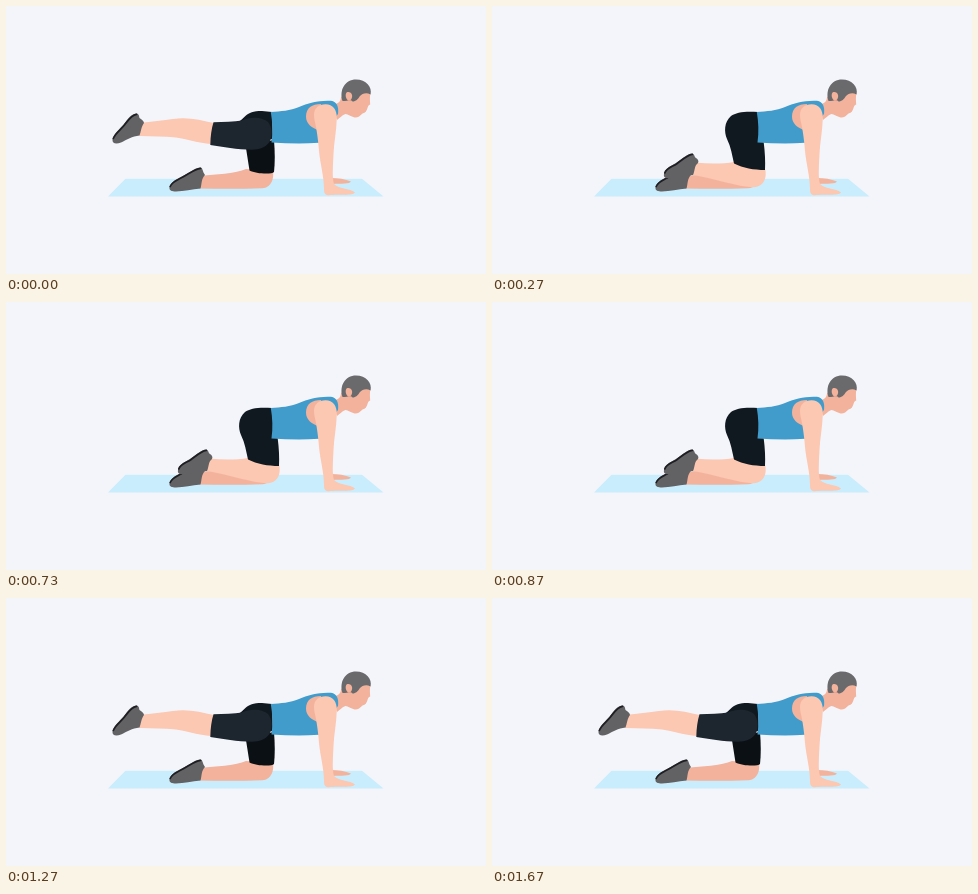
Animation of 480x268 px, one loop 1940 ms. Source, as an HTML page with a canvas:

```html
<!DOCTYPE html>
<html lang="en">
<head>
<meta charset="utf-8">
<title>Kneeling leg raise</title>
<style>
html, body { margin: 0; width: 100%; height: 100%; overflow: hidden; background: #f3f5fa; }
canvas { display: block; width: 100vw; height: 100vh; }
</style>
</head>
<body>
<canvas id="stage"></canvas>
<script>
const W = 480, H = 268;
const LOOP = 1940, LOWER_AT = 70, RAISE_AT = 1000;
const canvas = document.getElementById('stage');
const ctx = canvas.getContext('2d');

const color = {
  bg: '#f3f5fa', mat: '#c9edfc', skin: '#fcc8b2', shade: '#f3b29b',
  shirt: '#419ccb', thigh: '#1d262e', hip: '#111920', shortsFar: '#0b1015',
  shoe: '#626164', sole: '#1f1f23', hair: '#6a6a6d'
};

function fill(d, c) {
  ctx.fillStyle = c;
  ctx.fill(new Path2D(d));
}

function line(d, c, width) {
  ctx.strokeStyle = c;
  ctx.lineWidth = width;
  ctx.stroke(new Path2D(d));
}

function drawMat() {
  fill('M119.5 172.8H356L377.5 190.5H102Z', color.mat);
}

function drawFarShin() {
  fill('M195 170C211 168 227 168 240 163L267 165C268 172 266 181 257 182.3C236 183 214 183 193 182.5Z', color.shade);
  fill('M163.5 181.5C164 177 169 174 174 171.5C182 168 188 162 194 161.5C197 161.5 196 165 199 169C195 173 196 178 194.5 182.5C186 183 178 185.5 170 185.5C166 185.5 163 184.5 163.5 181.5Z', color.shoe);
  line('M164.2 180.5C166 176 170 174.5 174 172.5C182 169 188 163 194.5 162.3', color.sole, 1.7);
}

function drawRaisedLegs() {
  drawFarShin();
  fill('M239.5 139L268 134C269 146 269 157 268 166C266 168.5 250 168 243.5 164.5Z', color.shortsFar);
  // lifted leg
  fill('M133 117C146 115.5 157 114.5 167 113C181 110.5 195 114 208 117L205 138C192 137 181 133 170 131.5C158 130 146 130.5 133 130Z', color.skin);
  fill('M106.5 133.5C108 127 114 123 118 118C122 113 125 108 130 107.5C133 107.5 133 110 133.5 112C136 114 138 115 138 117C135 121 135 126 133.5 129.5C126 130.5 121 133.5 115 136.5C110 138.5 106 137.5 106.5 133.5Z', color.shoe);
  line('M107.3 132.5C109 127.5 115 123.5 118.7 118.7C122.5 113.8 125.5 109 130.5 108.3', color.sole, 1.7);
  // shorts: hip behind the raised thigh
  fill('M230 117C240 113 238 105 256 105L266 106L267 133L235 138Z', color.hip);
  fill('M207.5 116.3C218 116 228 115.5 236 114.5C245 110 257 111 262 116C266 121 267 129 263.5 136C259 142 253 143.7 246 143.7C231 143.7 217 141 204.3 139C204.5 130 205.5 123 207.5 116.3Z', color.thigh);
}

function drawLoweredLegs() {
  drawFarShin();
  fill('M203 156.5C217 158 231 158 242 156L273 162C275 171 273 180 262 181.3C245 181 222 172 201 169Z', color.skin);
  fill('M172 168C173 162 179 160 184 157C191 152 196 147.5 200 147.5C203 148 202 151 204 152C206 153 207 155 206 157C202 160 203 165 201 169C193 169 186 172.5 179 172.5C175 172.5 171 172 172 168Z', color.shoe);
  line('M172.8 167C174 162.5 179.5 161 184.5 158C191 153 196 148.5 200.3 148.3', color.sole, 1.7);
  fill('M266 106C254 105 244 106 239 110C232 116 232 126 235 133C239 141 240 149 242 157.5C251 162 262 164 273 164C274 147 271 127 266 106Z', color.hip);
}

function drawHead() {
  fill('M335 91L350 84L364.5 87C363.5 91 364 95 364.2 98.5C362.5 99 362 100 361.5 102C360.5 105 359.5 107 356.5 107.5C354 110 351.5 112 348.5 111.5C345 110.5 342 108.5 339.5 108C336 109 334 112 331 114L325 99C330 98.5 335 97 335 91Z', color.shade);
  fill('M336.5 95C333 84 339 73.5 350 73.5C360 73.5 366.5 81 364.5 88.5C360 86 356 88 354 90C352 93 350 95.5 346.5 95.5C345 93 342 95 336.5 95Z', color.hair);
  fill('M340 87.5C341 85 345.5 86 346 89C346.5 92 345 95 342.5 94.5C340.5 94 339 90 340 87.5Z', color.shade);
}

function drawUpperBody() {
  // far hand
  fill('M325 172C332 172 339 173 345 175.5C344 178 335 177.5 326 178Z', color.shade);
  drawHead();
  fill('M264.8 106C275 105.5 284 104.5 293 101C302 97 314 94 325 94.8C331 95.5 333 101 332 108L327 114L313 136.8C297 138 281 137.5 265.5 136.5C267 126 266.5 116 264.8 106Z', color.shirt);
  // shoulder in the armhole, then the near arm
  fill('M300 110.5C300 102 306 98 315 98L313 124.5C306 122 300 118 300 110.5Z', color.shade);
  fill('M308 109C308 102 313 98.3 319.5 98.3C327 98.3 331 104 330.8 112C330.5 125 328 136 327.5 148C327 160 326 171 328 178C332 183 344 182 349 186.5C347 190 333 188 323 189.3C319 189.5 318 187 318 183C318 170 314 157 313 145C312 133 311 127 310 121C309 116 308 113 308 109Z', color.skin);
}

function render(now) {
  const t = now % LOOP;
  const scale = window.devicePixelRatio || 1;
  const w = Math.round(innerWidth * scale), h = Math.round(innerHeight * scale);
  if (canvas.width !== w || canvas.height !== h) {
    canvas.width = w;
    canvas.height = h;
  }
  ctx.setTransform(w / W, 0, 0, h / H, 0, 0);
  ctx.lineCap = 'round';
  ctx.fillStyle = color.bg;
  ctx.fillRect(0, 0, W, H);
  drawMat();
  // the pose switches without a transition
  if (t >= LOWER_AT && t < RAISE_AT) drawLoweredLegs();
  else drawRaisedLegs();
  drawUpperBody();
}

const start = performance.now();
function tick() {
  render(performance.now() - start);
  requestAnimationFrame(tick);
}
tick();
</script>
</body>
</html>
```
